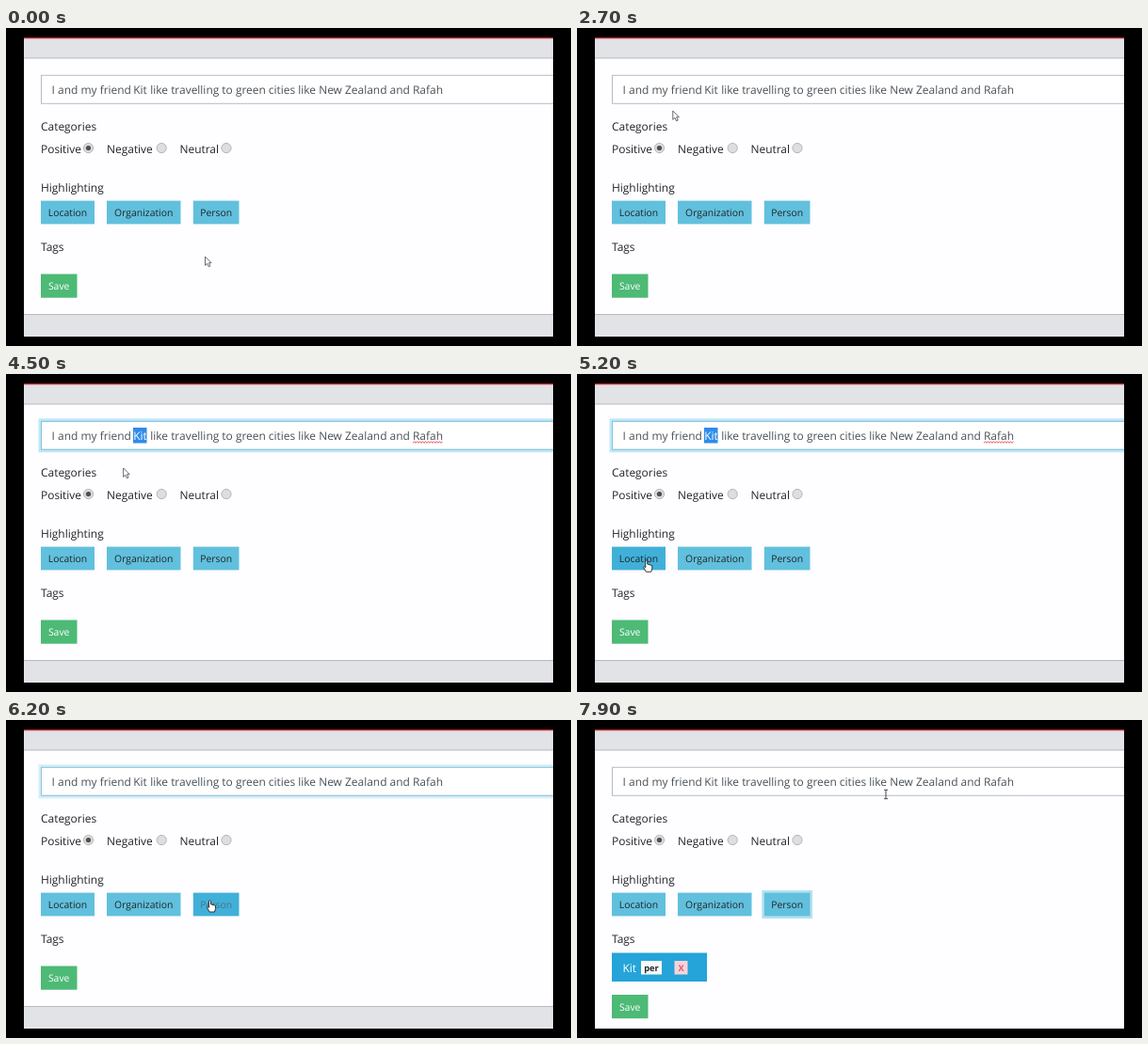
Write an HTML page that moves like this. It is 600 px wide and 338 px high and loops after 8000 ms.

```html
<!DOCTYPE html>
<html lang="en">
<head>
<meta charset="utf-8">
<title>Text tagging form</title>
<style>
  html, body { margin: 0; width: 100%; height: 100%; overflow: hidden; background: #000; }
  svg { display: block; width: 600px; height: 338px; }
  text {
    font: 11.95px "Open Sans", "Noto Sans", sans-serif;
    fill: #212529;
    text-rendering: geometricPrecision;
  }
  .sentence text { fill: #495057; }
  .small text { font-size: 10.4px; text-anchor: middle; }
  text.badge { font-size: 9.3px; font-weight: 700; text-anchor: middle; }
  .white, .sentence .white { fill: #fff; }
  .button rect { fill: #61c0dd; }
  .button.hover rect { fill: #40b0d9; }
  .button.pressed text { fill: #4f7383; }
  .button .ring { visibility: hidden; }
  .button.focus .ring { visibility: visible; fill: #b3e2f0; }
  .radio circle { fill: #dedede; stroke: #adadad; stroke-width: .9; }
  .radio .dot { fill: #505050; stroke: none; visibility: hidden; }
  .radio.on .dot { visibility: visible; }
  .edge { fill: #b7b9be; }
  .bar { fill: #e1e3e7; }
</style>
</head>
<body>
<svg viewBox="0 0 600 338">
  <defs>
    <clipPath id="screen"><rect x="19" y="10" width="562" height="318"/></clipPath>
  </defs>
  <rect width="600" height="338"/>
  <g clip-path="url(#screen)">
    <rect x="19" y="10" width="562" height="318" fill="#fefdff"/>
    <rect class="bar" x="19" y="11" width="562" height="21"/>
    <rect x="19" y="10" width="562" height="1.3" fill="#c4242e"/>
    <rect class="edge" x="19" y="31.5" width="562" height="1"/>
    <g id="footer">
      <rect class="bar" x="19" y="304" width="562" height="24"/>
      <rect class="edge" x="19" y="304" width="562" height="1"/>
    </g>

    <rect x="37.5" y="50.3" width="600" height="30" fill="#fff" stroke="#b4bdc5"/>
    <g id="glow" fill="none">
      <rect x="36" y="48.8" width="603" height="33" stroke="#bfe8f6" stroke-width="3"/>
      <rect x="37.5" y="50.3" width="600" height="30" stroke="#82c3e3"/>
    </g>
    <g class="sentence">
      <text x="48.6" y="70">I and my friend</text>
      <text x="135.2" y="70">Kit</text>
      <text x="153.3" y="70">like travelling to green cities like New Zealand and Rafah</text>
      <g id="selection">
        <rect x="135" y="57" width="14.5" height="16.5" fill="#2f8bea"/>
        <text class="white" x="135.2" y="70">Kit</text>
      </g>
    </g>
    <path id="squiggle" fill="none" stroke="#e0323c" stroke-width=".9"/>

    <text x="37" y="108.8">Categories</text>
    <text x="37" y="133.2">Positive</text>
    <text x="107" y="133.2">Negative</text>
    <text x="184.5" y="133.2">Neutral</text>
    <g id="radios"></g>
    <text x="37" y="173.7">Highlighting</text>
    <g id="buttons" class="small"></g>
    <text x="37" y="236.8">Tags</text>
    <g id="tag">
      <rect x="37" y="247.5" width="101" height="30.5" fill="#24a4d8"/>
      <text class="white" x="48.5" y="267.5">Kit</text>
      <rect x="68" y="256" width="22" height="14.5" fill="#f8f9fa"/>
      <text class="badge" x="79" y="267.3">per</text>
      <rect x="103.5" y="256" width="14" height="14.5" fill="#f8d3da"/>
      <text class="badge" x="110.5" y="267.3" style="fill:#dc5a68">X</text>
    </g>
    <g id="save" class="small">
      <rect x="37" y="261.5" width="38.5" height="25.2" fill="#4dba76"/>
      <text class="white" x="56.2" y="278.4">Save</text>
    </g>

    <g id="cursor" stroke-linejoin="round">
      <path data-kind="arrow" d="M0 0V9.3L2.2 7.3 3.8 10.8 5.4 10 3.9 6.7H6.6Z" fill="#fff" stroke="#444" stroke-width=".8"/>
      <path data-kind="beam" d="M-2 -4.7H2M0 -4.7V4.7M-2 4.7H2" fill="none" stroke="#444"/>
      <path data-kind="hand" d="M-1 .8Q0 -.5 1 .8V4.3L6 5.8V9L5 12.5H-.4L-3.2 7.6Q-3 6.2 -1 7.8Z" fill="#fff" stroke="#222" stroke-width=".9"/>
    </g>
  </g>
</svg>
<script>
const LOOP = 8000, STEP = 100;
const $ = id => document.getElementById(id);
const show = (el, on) => { el.style.visibility = on ? "visible" : "hidden"; };
const between = (v, a, b) => v >= a && v < b;
const ramp = (t, a, b) => Math.min(1, Math.max(0, (t - a) / (b - a)));
const ease = p => (1 - Math.cos(Math.PI * p)) / 2;

// Pointer moves: each follows a Bezier curve on from where the last one ended
const home = [211.5, 243];
const moves = [
  { from: 0, to: 700, via: [[450, 170], [-50, -25], [167, 129]] },
  { from: 1200, to: 1900, via: [[89.5, 127]] },
  { from: 2300, to: 3200, via: [[96, 67.5], [143, 68]] },
  { from: 4200, to: 5100, via: [[69.5, 196]] },
  { from: 5100, to: 6000, via: [[140, 226], [216.5, 191.5]] },
  { from: 6900, to: 7900, via: [[325, 26], [328, 79]] }
];

function bezier(points, p) {
  while (points.length > 1) {
    points = points.slice(1).map((b, i) => b.map((v, j) => points[i][j] + (v - points[i][j]) * p));
  }
  return points[0];
}

const pointerAt = t => moves.reduce(
  (pos, { from, to, via }) => bezier([pos, ...via], ease(ramp(t, from, to))), home);

const buttons = [["Location", 37, 57], ["Organization", 107, 78.5], ["Person", 198.8, 48.7]];
$("buttons").innerHTML = buttons.map(([label, x, w]) => `<g class="button">
  <rect class="ring" x="${x - 2.5}" y="181" width="${w + 5}" height="30"/>
  <rect x="${x}" y="183.6" width="${w}" height="24.8"/>
  <text x="${x + w / 2}" y="200.3">${label}</text></g>`).join("");
$("radios").innerHTML = [87.5, 165.2, 234].map(x => `<g class="radio">
  <circle cx="${x}" cy="127.6" r="5.1"/>
  <circle class="dot" cx="${x}" cy="127.6" r="2.7"/></g>`).join("");

let wave = "M432 73.3";
for (let x = 433.5, up = true; x < 464; x += 1.5, up = !up) wave += `L${x} ${up ? 71.9 : 73.3}`;
$("squiggle").setAttribute("d", wave);

const buttonEls = [...$("buttons").children];
const radioEls = [...$("radios").children];
const cursorEls = [...$("cursor").children];

function draw(t) {
  const [x, y] = pointerAt(t);
  const hovered = buttons.findIndex(([, left, w]) =>
    between(x, left, left + w) && between(y, 184, 208));
  const inField = x > 37 && between(y, 50, 81);
  const kind = hovered >= 0 ? "hand" : inField ? "beam" : "arrow";
  const tagged = t >= 6400;

  $("cursor").setAttribute("transform", `translate(${x} ${y})`);
  cursorEls.forEach(el => show(el, el.dataset.kind === kind));

  buttonEls.forEach((el, i) => {
    el.classList.toggle("hover", i === hovered);
    el.classList.toggle("pressed", i === 2 && between(t, 6100, 6400));
    el.classList.toggle("focus", i === 2 && tagged);
  });
  const chosen = between(t, 1100, 2400) ? 1 : 0;
  radioEls.forEach((el, i) => el.classList.toggle("on", i === chosen));

  $("glow").style.opacity = ramp(t, 3600, 3800) - ramp(t, 6100, 6400);
  show($("selection"), between(t, 3700, 6100));
  show($("squiggle"), between(t, 4300, 6100));
  show($("tag"), tagged);
  show($("footer"), !tagged);
  $("save").setAttribute("transform", `translate(0 ${tagged ? 30.5 : 0})`);
}

const start = performance.now();
function frame() {
  const t = (performance.now() - start) % LOOP;
  draw(Math.floor(t / STEP) * STEP);
  requestAnimationFrame(frame);
}
frame();
</script>
</body>
</html>
```
